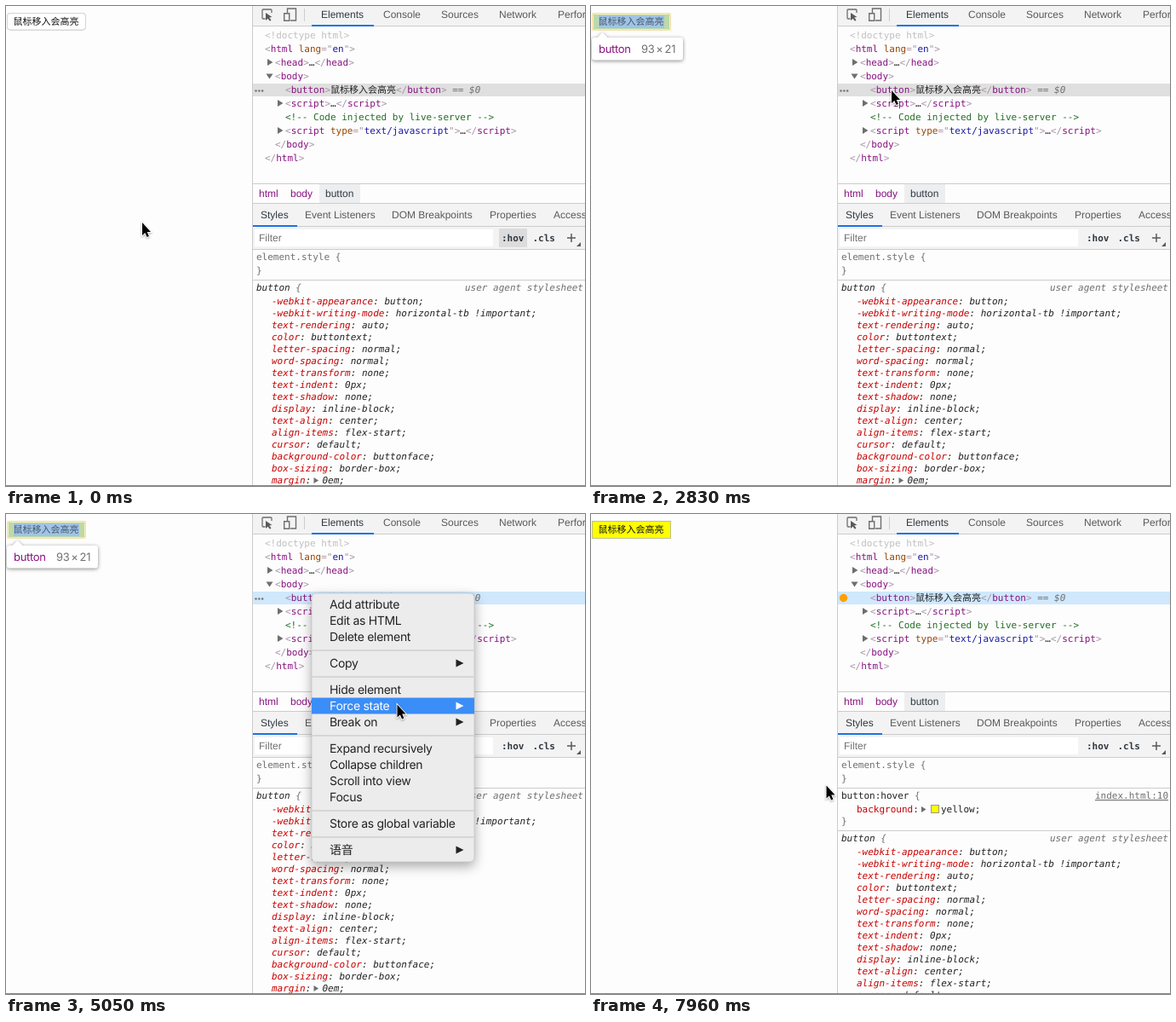
An HTML page that plays this animation: 680x563 px, repeating every 8000 ms.

```html
<!DOCTYPE html>
<html lang="zh-CN">
<head>
<meta charset="utf-8">
<title>Force hover state</title>
<style>
html, body { margin: 0; width: 100%; height: 100%; overflow: hidden; background: #fdfdfd; }
svg { display: block; width: 680px; height: 563px; text-rendering: geometricPrecision; }
text { white-space: pre; }
.ui { font: 12px "Liberation Sans", Arial, sans-serif; fill: #5a5a5a; }
.mono { font: 11px "DejaVu Sans Mono", "Noto Sans CJK SC", monospace; fill: #222; }
.cjk { font: 11px "Noto Sans CJK SC", "Noto Sans CJK", sans-serif; fill: #111; }
.it { font-style: italic; }
.b { font-weight: bold; }
.end { text-anchor: end; }
.dark { fill: #303942; }
.punct { fill: #a894a6; }
.name { fill: #881280; }
.attr { fill: #994500; }
.val { fill: #1a1aa6; }
.note { fill: #236e25; }
.pale { fill: #c0c0c0; }
.gray { fill: #707070; }
.prop { fill: #c80000; }
.menu { font: 14px Inter, "Noto Sans CJK SC", sans-serif; letter-spacing: -.3px; }
.panel { fill: #ececec; stroke: #bdbdbd; stroke-width: .6; filter: drop-shadow(0 5px 7px #0005); }
.item { fill: #222; }
.item rect { fill: none; }
.item.on { fill: #fff; }
.item.on rect { fill: #3b8df7; }
.tip { font: 13px Inter, sans-serif; letter-spacing: -.3px; word-spacing: -1.5px; }
</style>
</head>
<body>
<svg id="stage" viewBox="0 0 680 563"></svg>
<script>
const LOOP = 8000;
const LABEL = '鼠标移入会高亮';

const rect = (x, y, w, h, fill, more = '') =>
  `<rect x="${x}" y="${y}" width="${w}" height="${h}" fill="${fill}" ${more}/>`;
const path = (d, fill, more = '') => `<path d="${d}" fill="${fill}" ${more}/>`;
const text = (x, y, cls, s) => `<text x="${x}" y="${y}" class="${cls}">${s}</text>`;
const span = (cls, s) => `<tspan class="${cls}">${s}</tspan>`;
const group = (id, s, more = '') => `<g id="${id}" ${more}>${s}</g>`;
const rule = y => rect(290, y, 390, 1, '#ccc');
const right = (x, y, s = 4, fill = '#6e6e6e') => path(`M${x} ${y - s}l${s * 1.6} ${s}l${-s * 1.6} ${s}z`, fill);

function tag(name, key, value) {
  const slash = name[0] === '/' ? '/' : '';
  const attr = key ? ' ' + span('attr', key) + '="' + span('val', value) + '"' : '';
  return span('punct', '&lt;' + slash + span('name', name.slice(slash.length)) + attr + '&gt;');
}

function page() {
  return group('plain',
      rect(1.5, 8.5, 92, 19.5, '#fff', 'rx="3.5" stroke="#d4d4d4" style="filter:drop-shadow(0 .6px .5px #0004)"')) +
    group('yellow', rect(1.5, 8.5, 92, 20, '#ff0', 'stroke="#bfbf8a"')) +
    text(8.5, 22, 'cjk', LABEL) +
    group('inspect',
      rect(1, 8, 93, 21, '#ffe599', 'opacity=".66"') +
      rect(3, 10, 89, 17, '#bcd9a8') +
      rect(9, 11, 77, 15, '#9fc4e7') +
      `<g opacity=".6">${text(8.5, 22, 'cjk', LABEL)}</g>` +
      `<g style="filter:drop-shadow(0 1px 2px #0007)">` +
      rect(1, 37, 107, 26.5, '#fff', 'rx="3"') + path('M7 37.5l6.500-6.500 6.500 6.500z', '#fff') + '</g>' +
      text(9, 55, 'tip b name', 'button') + text(59, 55, 'tip gray', '93 × 21'));
}

function toolbar() {
  const tabs = [[370, 'Elements'], [443, 'Console'], [511, 'Sources'], [579, 'Network'], [648, 'Performance']];
  return rect(290, 0, 390, 23, '#f3f3f3') + rule(23) + rect(359, 22, 73, 2, '#1a73e8') +
    rect(350, 3, 1, 15, '#ccc') +
    path('M304.500 15h-2.500q-1 0-1-1v-9q0-1 1-1h9q1 0 1 1v3', 'none', 'stroke="#6e6e6e" stroke-width="1.3"') +
    path('M305 8v9l2.500-2.300 2.500 3 1.500-1.200-2.300-3 3.300-.5z', '#5a5a5a') +
    path('M330.500 8v-5h10v14h-6.500M326.700 8.700h6v8.500h-6z', 'none', 'stroke="#6e6e6e" stroke-width="1.4"') +
    tabs.map(([x, s], i) => text(x, 14, i ? 'ui' : 'ui dark', s)).join('');
}

function tree() {
  const rows = [
    [304, span('pale', '&lt;!doctype html&gt;')],
    [304, tag('html', 'lang', 'en')],
    [316, tag('head') + '…' + tag('/head')],
    [316, tag('body')],
    [328, tag('button') + LABEL + tag('/button') + span('gray it', ' == $0')],
    [328, tag('script') + '…' + tag('/script')],
    [328, span('note', '&lt;!-- Code injected by live-server --&gt;')],
    [328, tag('script', 'type', 'text/javascript') + '…' + tag('/script')],
    [316, tag('/body')],
    [304, tag('/html')]
  ];
  const dots = [293.5, 297.3, 301.1].map(x => `<circle cx="${x}" cy="99.500" r="1.300" fill="#777"/>`).join('');
  return '<rect id="row" x="290" y="91" width="390" height="15"/>' +
    group('dots', dots) + '<circle id="forced" cx="296.500" cy="98.500" r="4.700" fill="#ffa000"/>' +
    right(307, 66) + path('M305.500 79.500h8l-4 6z', '#6e6e6e') + right(319, 114) + right(319, 146) +
    rows.map(([x, s], i) => text(x, 38 + 16 * i, 'mono', s)).join('');
}

function sidebar() {
  const tabs = [[299, 'Styles'], [351, 'Event Listeners'], [453, 'DOM Breakpoints'], [568, 'Properties'], [643, 'Accessibility']];
  return rule(208) + rect(368, 209, 48, 22, '#eceef0') +
    text(297, 224, 'ui name', 'html') + text(334, 224, 'ui name', 'body') + text(375, 224, 'ui dark', 'button') +
    rect(290, 231, 390, 55, '#f3f3f3') + rule(231) +
    group('tabHover', rect(558, 232, 76, 26, '#e7e7e7')) +
    rule(258) + rect(290, 257, 52, 2, '#1a73e8') +
    tabs.map(([x, s], i) => text(x, 249, i ? 'ui' : 'ui dark', s)).join('') +
    rect(292, 262, 280, 20, '#fff') + text(297, 276, 'ui gray', 'Filter') +
    group('hov', rect(579, 261, 33, 22, '#dcdcdc')) +
    text(582, 276, 'mono b dark', ':hov') + text(618.5, 276, 'mono b dark', '.cls') +
    path('M664 267v10M659 272h10', 'none', 'stroke="#5a5a5a" stroke-width="1.500"') +
    path('M675 277v5h-5z', '#5a5a5a') + rule(285) +
    text(294, 298, 'mono gray', 'element.style {') + text(294, 314, 'mono gray', '}') + rule(321);
}

function styles() {
  const props = ['-webkit-appearance: button', '-webkit-writing-mode: horizontal-tb !important',
    'text-rendering: auto', 'color: buttontext', 'letter-spacing: normal', 'word-spacing: normal',
    'text-transform: none', 'text-indent: 0px', 'text-shadow: none', 'display: inline-block',
    'text-align: center', 'align-items: flex-start', 'cursor: default',
    'background-color: buttonface', 'box-sizing: border-box'];
  const line = (s, i) => {
    const [key, value] = s.split(': ');
    return text(312, 350 + 14 * i, 'mono it', span('prop', key) + `: ${value};`);
  };
  return group('hoverRule',
      text(294, 334, 'mono', 'button:hover ' + span('gray', '{')) +
      text(678, 334, 'mono gray end', '<tspan text-decoration="underline">index.html:10</tspan>') +
      text(312, 350, 'mono', span('prop', 'background') + ':') + right(388, 346.5, 3.5) +
      rect(399.5, 341.5, 9, 9, '#ff0', 'stroke="#999"') + text(411, 350, 'mono', 'yellow;') +
      text(294, 364, 'mono gray', '}') + rule(371) +
      group('ruleTools',
        rect(298.5, 341.5, 9, 9, '#fff', 'rx="2" stroke="#999"') +
        path('M300.500 346l2 2.500 3.500-5', 'none', 'stroke="#333" stroke-width="1.400"') +
        [356, 360, 364].map(y => `<circle cx="664" cy="${y}" r="1.200" fill="#6e6e6e"/>`).join(''))) +
    group('agent',
      text(294, 334, 'mono it', 'button ' + span('gray', '{')) +
      text(678, 334, 'mono it gray end', 'user agent stylesheet') +
      props.map(line).join('') +
      text(312, 560, 'mono it', span('prop', 'margin') + ':') + right(361.5, 556.5, 3.5) +
      text(371.5, 560, 'mono it', '0em;')) +
    rect(0, 562, 680, 1, '#858585');
}

const MAIN = [[106, 'Add attribute'], [125, 'Edit as HTML'], [144, 'Delete element'], [175, 'Copy', 1],
  [206, 'Hide element'], [225, 'Force state', 1], [244, 'Break on', 1], [275, 'Expand recursively'],
  [294, 'Collapse children'], [313, 'Scroll into view'], [332, 'Focus'],
  [363, 'Store as global variable'], [394, '语音', 1]];
const SUB = [':active', ':hover', ':focus', ':visited', ':focus-within', ':focus-visible']
  .map((s, i) => [225 + 19 * i, s]);

const items = (list, x, w) => list.map(([y, s, more]) =>
  `<g class="item">${rect(x, y - 9.5, w, 19, '')}${text(x + 21, y + 5, 'menu', s)}` +
  (more ? path(`M${x + 169.5} ${y - 4.5}l9 4.500l-9 4.500z`, 'inherit').replace('fill="inherit"', '') : '') + '</g>').join('');

function menus() {
  const box = (x, y, w, h) => `<rect class="panel" x="${x}" y="${y}" width="${w}" height="${h}" rx="5"/>`;
  return group('menus',
    group('main', box(359, 93, 191, 315) +
      [160, 191, 260, 348, 379].map(y => rect(359, y - 1, 191, 2, '#d6d6d6')).join('') + items(MAIN, 359, 191)) +
    group('sub', box(550, 212, 127.5, 122) + items(SUB, 550, 127.5)));
}

const pointer = () => group('cursor',
  '<circle id="ring" cx="1.500" cy="0" r="10" fill="none" stroke="#111"/>' +
  path('M0 0v15l3.300-3 2.300 5 2.300-1-2.200-5h4.300z', '#000',
    'stroke="#fff" stroke-width="1.800" paint-order="stroke" style="filter:drop-shadow(0 1px 1px #0005)"'));

const stage = document.getElementById('stage');
stage.innerHTML = rect(0, 0, 680, 563, '#fdfdfd') + page() + rect(289, 0, 1, 563, '#cbcbcb') +
  toolbar() + tree() + sidebar() + styles() + menus() + pointer();

const el = {};
stage.querySelectorAll('[id]').forEach(n => el[n.id] = n);
const mainItems = [...el.main.querySelectorAll('.item')];
const subItems = [...el.sub.querySelectorAll('.item')];

// Pointer tip: time, x, y
const PATH = [
  [0, 160, 254], [660, 160, 254], [900, 135, 165], [1110, 100, 60], [1260, 78, 21], [1360, 76, 22],
  [1510, 92, 66], [1570, 92, 66], [1760, 78, 30], [1900, 70, 22], [2030, 70, 22], [2080, 74.5, 26],
  [2300, 118, 50], [2540, 225, 82], [2700, 310, 98], [2830, 353, 99], [2900, 353, 99],
  [3200, 357, 97], [4310, 357, 97], [4600, 385, 128], [4850, 435, 188], [5050, 459.5, 223.5],
  [5160, 459.5, 231], [5580, 459.5, 231], [5800, 548, 231.5], [5825, 556, 236], [6030, 620, 246],
  [7090, 620, 246], [7300, 575, 275], [7550, 445, 333], [7750, 330, 357], [7900, 284.5, 340],
  [7959, 284.5, 340], [7960, 276.5, 318.5], [LOOP, 276.5, 318.5]
];
const CLICKS = [[410, 530], [3290, 3400], [4060, 4120], [6260, 6320]];

function tipAt(t) {
  const i = PATH.findIndex(p => p[0] > t);
  const [t0, x0, y0] = PATH[i - 1], [t1, x1, y1] = PATH[i];
  const k = (t - t0) / (t1 - t0);
  return [x0 + (x1 - x0) * k, y0 + (y1 - y0) * k];
}

const within = (t, a, b) => t >= a && t < b;
const show = (node, on) => node.style.display = on ? '' : 'none';
const mark = (nodes, list, test) => nodes.forEach((n, i) => n.classList.toggle('on', test(list[i][0])));

function draw(t) {
  const [x, y] = tipAt(t);
  const forced = t >= 6610, ruled = t >= 6720;
  const onButton = within(x, 1, 94) && within(y, 8, 29);
  el.cursor.setAttribute('transform', `translate(${x} ${y})`);
  show(el.ring, CLICKS.some(([a, b]) => within(t, a, b)));
  show(el.yellow, forced || onButton);
  show(el.plain, !forced && !onButton);
  show(el.inspect, within(t, 2720, 6610));
  el.row.setAttribute('fill', t < 3400 ? '#dfdfdf' : '#cfe8fc');
  show(el.dots, !forced);
  show(el.forced, forced);
  show(el.hov, t < 530);
  show(el.tabHover, t >= 6550 && within(x, 558, 634) && within(y, 232, 258));
  show(el.hoverRule, ruled);
  show(el.ruleTools, x > 284 && within(y, 322, 371));
  el.agent.setAttribute('transform', `translate(0 ${ruled ? 50 : 0})`);

  show(el.menus, within(t, 4120, 6570));
  show(el.sub, t >= 5220);
  el.menus.setAttribute('opacity', Math.min(1, Math.max(0, 1 - (t - 6350) / 220)));
  const hit = c => Math.abs(y - c) < 9.5;
  const inSub = x >= 550, blink = within(t, 6260, 6320);
  mark(mainItems, MAIN, c => inSub ? c === 225 : x > 359 && hit(c));
  mark(subItems, SUB, c => inSub && !blink && hit(c));
}

const start = performance.now();
function frame() {
  draw((performance.now() - start) % LOOP);
  requestAnimationFrame(frame);
}
frame();
</script>
</body>
</html>
```
